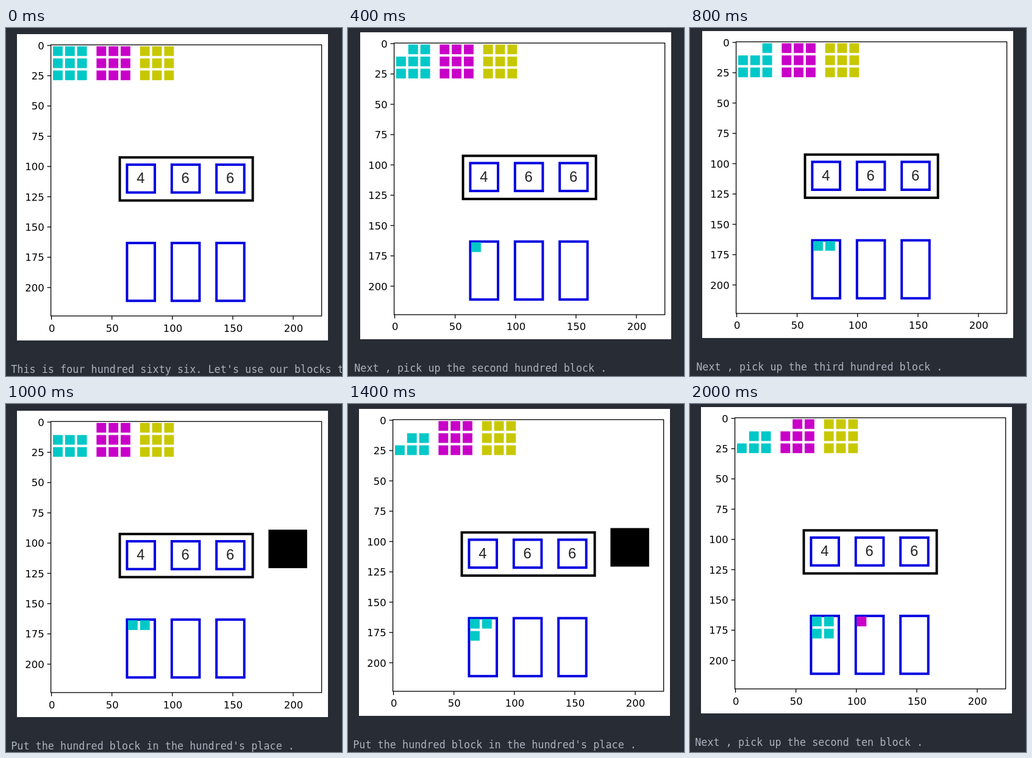
Recreate the animation shown at these times as an HTML page with a canvas. Size 551 px wide and 568 px high, loop 2.2 s.

```html
<!DOCTYPE html>
<html lang="en">
<head>
<meta charset="utf-8">
<title>Place value blocks</title>
<style>
html, body { margin: 0; width: 100%; height: 100%; overflow: hidden; background: #282c34; }
canvas { display: block; }
</style>
</head>
<body>
<canvas id="stage" width="551" height="568"></canvas>
<script>
const ctx = document.getElementById('stage').getContext('2d');
const STEP = 200;
const STEPS = 11;
const DRIFT = 1.2;
const BLUE = '#0000e1';
const DIGITS = [4, 6, 6];
const COLORS = ['#00c8c8', '#c800c8', '#c8c800'];
const UNITS = ['hundred', 'ten', 'one'];
const ORDINALS = ['first', 'second', 'third', 'fourth', 'fifth', 'sixth'];
const INTRO = "This is four hundred sixty six. Let's use our blocks to";

// Plot area within the white figure; the picture spans 224 data units.
const AXES = { x: 55.6, y: 17.5, w: 444, h: 442.5 };
const UX = AXES.w / 224;
const UY = AXES.h / 224;

// Each shot starts at a step and then drifts upwards.
const SHOTS = [
  { from: 0, left: 18, base: 563 },
  { from: 1, left: 20, base: 563 },
  { from: 5, left: 18, base: 564.9 }
];

// How many of the first n blocks belong to each place.
function split(n) {
  return DIGITS.map((digit) => {
    const count = Math.min(n, digit);
    n -= count;
    return count;
  });
}

function captionAt(step, placed) {
  if (step === 0) return INTRO;
  const place = placed.findIndex((count, i) => count < DIGITS[i]);
  const unit = UNITS[place];
  return step % 2
    ? `Put the ${unit} block in the ${unit}'s place .`
    : `Next , pick up the ${ORDINALS[placed[place]]} ${unit} block .`;
}

function fill(color, x, y, w, h) {
  ctx.fillStyle = color;
  ctx.fillRect(x, y, w, h);
}

// Frame two units thick, measured at its outer edge.
function frame(color, x, y, w, h) {
  ctx.strokeStyle = color;
  ctx.lineWidth = 2;
  ctx.strokeRect(x + 1, y + 1, w - 2, h - 2);
}

function label(text, x, y, align) {
  ctx.textAlign = align;
  ctx.fillText(text, x, y);
}

function drawAxes() {
  ctx.strokeStyle = ctx.fillStyle = '#000';
  ctx.lineWidth = 1.3;
  ctx.strokeRect(AXES.x, AXES.y, AXES.w, AXES.h);
  ctx.font = '16.5px "DejaVu Sans", sans-serif';
  for (let v = 0; v <= 200; v += 25) {
    const y = AXES.y + (v + 0.5) * UY;
    ctx.fillRect(AXES.x - 6, y - 0.65, 6, 1.3);
    label(v, 44.8, y + 6.2, 'right');
    if (v % 50) continue;
    const x = AXES.x + (v + 0.5) * UX;
    ctx.fillRect(x - 0.65, AXES.y + AXES.h, 1.3, 6);
    label(v, x + 0.6, 485.5, 'center');
  }
}

function drawBoxes() {
  frame('#000', 56, 92, 112, 37.6);
  ctx.font = '12px "Liberation Sans", Arial, sans-serif';
  DIGITS.forEach((digit, i) => {
    const x = 62 + i * 37;
    frame(BLUE, x, 98, 25, 25);
    frame(BLUE, x, 162.7, 25, 49.8);
    ctx.fillStyle = '#222';
    label(digit, x + 12.3, 114.4, 'center');
  });
}

// Fills the cells from..to of a grid with the given number of columns.
function drawGrid(color, x, y, cols, from, to) {
  for (let i = from; i < to; i++) {
    fill(color, x + (i % cols) * 10, y + Math.floor(i / cols) * 10, 8, 8);
  }
}

function drawPicture(taken, placed, putting) {
  ctx.filter = 'blur(0.5px)';
  drawBoxes();
  COLORS.forEach((color, i) => {
    drawGrid(color, 1.75 + i * 36, 1.2, 3, taken[i], 9);
    drawGrid(color, 63.8 + i * 37, 164.3, 2, 0, placed[i]);
  });
  if (putting) fill('#000', 180, 89.4, 32, 31.8);
  ctx.filter = 'none';
}

function draw(step) {
  const shot = SHOTS.findLast((s) => s.from <= step);
  const baseline = Math.floor(shot.base - DRIFT * (step - shot.from));
  const left = shot.left;
  // Scrolling by fractions makes the figure snap to one pixel taller at times.
  const height = 500 + (step * 2 % 5 > 2 ? 1 : 0);
  const top = baseline - 53 - height;
  const scale = height / 500;
  const taken = split(Math.ceil(step / 2));
  const placed = split(Math.floor(step / 2));

  ctx.setTransform(1, 0, 0, 1, 0, 0);
  fill('#282c34', 0, 0, 551, 568);
  ctx.fillStyle = '#abb2bf';
  ctx.font = '16.8px "DejaVu Sans Mono", monospace';
  label(captionAt(step, placed), left - 9.8, baseline, 'left');
  fill('#fff', left, top, 510, height);

  ctx.setTransform(UX, 0, 0, UY * scale, left + AXES.x, top + AXES.y * scale);
  drawPicture(taken, placed, step % 2 === 1);

  ctx.setTransform(1, 0, 0, scale, left, top);
  drawAxes();
}

let shown = -1;
function tick() {
  const step = Math.floor(performance.now() / STEP) % STEPS;
  if (step !== shown) draw(shown = step);
  requestAnimationFrame(tick);
}
tick();
</script>
</body>
</html>
```
